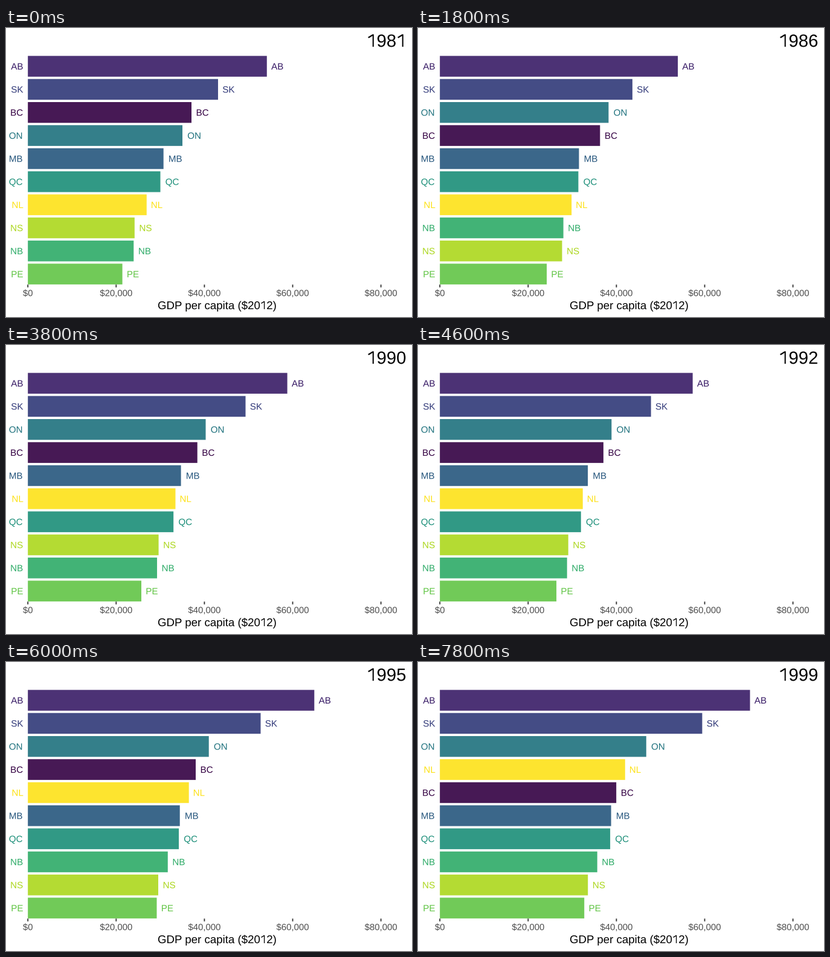
A matplotlib script that plays this animation: 672 px wide and 480 px high, repeating every 8 s.

```python
import matplotlib
import matplotlib.pyplot as plt
import numpy as np
from matplotlib.animation import FuncAnimation
from matplotlib.patches import PathPatch, Rectangle
from matplotlib.path import Path
from matplotlib.textpath import TextPath

matplotlib.rcParams["font.family"] = "Liberation Sans"

W, H, DPI = 672, 480, 96
X0, UNIT = 36.2, 7.305            # x of $0 and pixels per $1,000
TOP, PITCH, THICK = 63.6, 38.34, 34.5
LABEL, TICK, TITLE, YEAR = 15.17, 14.93, 18.67, 29.33

# GDP per capita in $1,000 at a few key years, ordered along the colour map.
KEY_YEARS = [1981, 1983, 1988, 1990, 1995, 1999]
PROVINCES = {
    "BC": [37.07, 34.00, 38.58, 38.40, 38.03, 39.97],
    "AB": [54.15, 50.28, 57.55, 58.78, 64.90, 70.27],
    "SK": [43.09, 41.90, 45.35, 49.32, 52.74, 59.44],
    "MB": [30.73, 29.54, 33.49, 34.69, 34.43, 38.80],
    "ON": [35.02, 34.74, 41.70, 40.29, 41.00, 46.76],
    "QC": [30.02, 29.20, 33.56, 32.99, 34.20, 38.59],
    "NB": [23.97, 25.57, 30.40, 29.27, 31.70, 35.66],
    "PE": [21.41, 23.24, 25.19, 25.71, 29.20, 32.72],
    "NS": [24.18, 25.37, 30.01, 29.62, 29.54, 33.54],
    "NL": [26.91, 27.83, 31.85, 33.44, 36.48, 41.97],
}
YEARS = np.arange(KEY_YEARS[0], KEY_YEARS[-1] + 1)


def yearly(keys):
    """Values for every year, with a 1992 slump that spares poorer provinces."""
    before = keys[KEY_YEARS.index(1990)]
    slump = before - 1.5 + 2.2 * np.exp((25.7 - before) / 4.8)
    at = KEY_YEARS.index(1995)
    return np.interp(YEARS, KEY_YEARS[:at] + [1992] + KEY_YEARS[at:],
                     keys[:at] + [slump] + keys[at:])


def shade(i):
    """Viridis, deepened by a gamma curve."""
    r, g, b = np.array(plt.cm.viridis(i / (len(PROVINCES) - 1))[:3]) ** 1.215
    return r + .05 * g * (1 - r), g, b


def timeline():
    """A frame on each year and one between; every sixth gap gets two."""
    times = []
    for year in YEARS[:-1]:
        parts = 3 if year % 6 == 0 else 2
        times += [year + k / parts for k in range(parts)]
    return times + [float(YEARS[-1])]


TIMES = timeline()
VALUES = np.array([yearly(keys) for keys in PROVINCES.values()])
RANKS = (-VALUES).argsort(axis=0).argsort(axis=0)

# A numeral one without a foot, in em units.
ONE = Path([(.395, 0), (.395, .708), (.325, .708), (.065, .55),
            (.11, .485), (.325, .62), (.325, 0), (.395, 0)], closed=True)


def advance(s, size):
    def right(t):
        return TextPath((0, 0), t, size=size).get_extents().x1
    return right(s + "l") - right("l")


def outline(s, size):
    """Outline of a text on the baseline, y pointing down, and its width."""
    parts, x = [], 0
    for i, chunk in enumerate(s.split("1")):
        if i:
            parts.append(Path(ONE.vertices * size + (x, 0), ONE.codes))
            x += .556 * size
        if chunk:
            parts.append(TextPath((x, 0), chunk, size=size))
            x += advance(chunk, size)
    path = Path.make_compound_path(*parts)
    return Path(path.vertices * (1, -1), path.codes), x


def moved(path, x, y):
    return Path(path.vertices + (x, y), path.codes)


fig = plt.figure(figsize=(W / DPI, H / DPI), dpi=DPI, facecolor="white")
ax = fig.add_axes([0, 0, 1, 1])
ax.set_xlim(0, W)
ax.set_ylim(H, 0)
ax.axis("off")


def add_text(path, color, x=0, y=0):
    return ax.add_patch(PathPatch(moved(path, x, y), fc=color, ec="none",
                                  lw=0, zorder=3, snap=False))


def centred(s, x, y, size, color):
    path, width = outline(s, size)
    add_text(path, color, x - width / 2, y)


for k in range(0, 81, 20):
    x = X0 + k * UNIT
    ax.plot([x, x], [426.2, 430.8], color="#333333", lw=1.36,
            solid_capstyle="butt", snap=False)
    centred(f"${1000 * k:,}", x, 445.3, TICK, "#4d4d4d")
centred("GDP per capita ($2012)", 349.4, 467, TITLE, "black")


def make_row(i, name):
    color = shade(i)
    # Western provinces lie over eastern ones while they swap places.
    bar = Rectangle((X0, 0), 1, THICK, fc=color, ec="none", lw=0, alpha=.9,
                    zorder=2 - i / 100, snap=False)
    ax.add_patch(bar)
    path, width = outline(name, LABEL)
    return bar, path, width, add_text(path, color), add_text(path, color)


rows = [make_row(i, name) for i, name in enumerate(PROVINCES)]
counter = add_text(outline("1981", YEAR)[0], "black")


def draw(frame):
    t = TIMES[frame]
    for (bar, path, width, left, right), values, ranks in zip(rows, VALUES, RANKS):
        end = X0 + UNIT * np.interp(t, YEARS, values)
        y = TOP + PITCH * np.interp(t, YEARS, ranks)
        bar.set_y(y - THICK / 2)
        bar.set_width(end - X0)
        left.set_path(moved(path, X0 - 1.38 * width, y + 5.4))
        right.set_path(moved(path, end + .36 * width, y + 5.4))
    path, width = outline(str(int(t + .5)), YEAR)
    counter.set_path(moved(path, 662.4 - width, 31.2))
    return []


anim = FuncAnimation(fig, draw, frames=len(TIMES), interval=200,
                     init_func=lambda: draw(0), repeat=True, repeat_delay=0)
plt.show()
```
